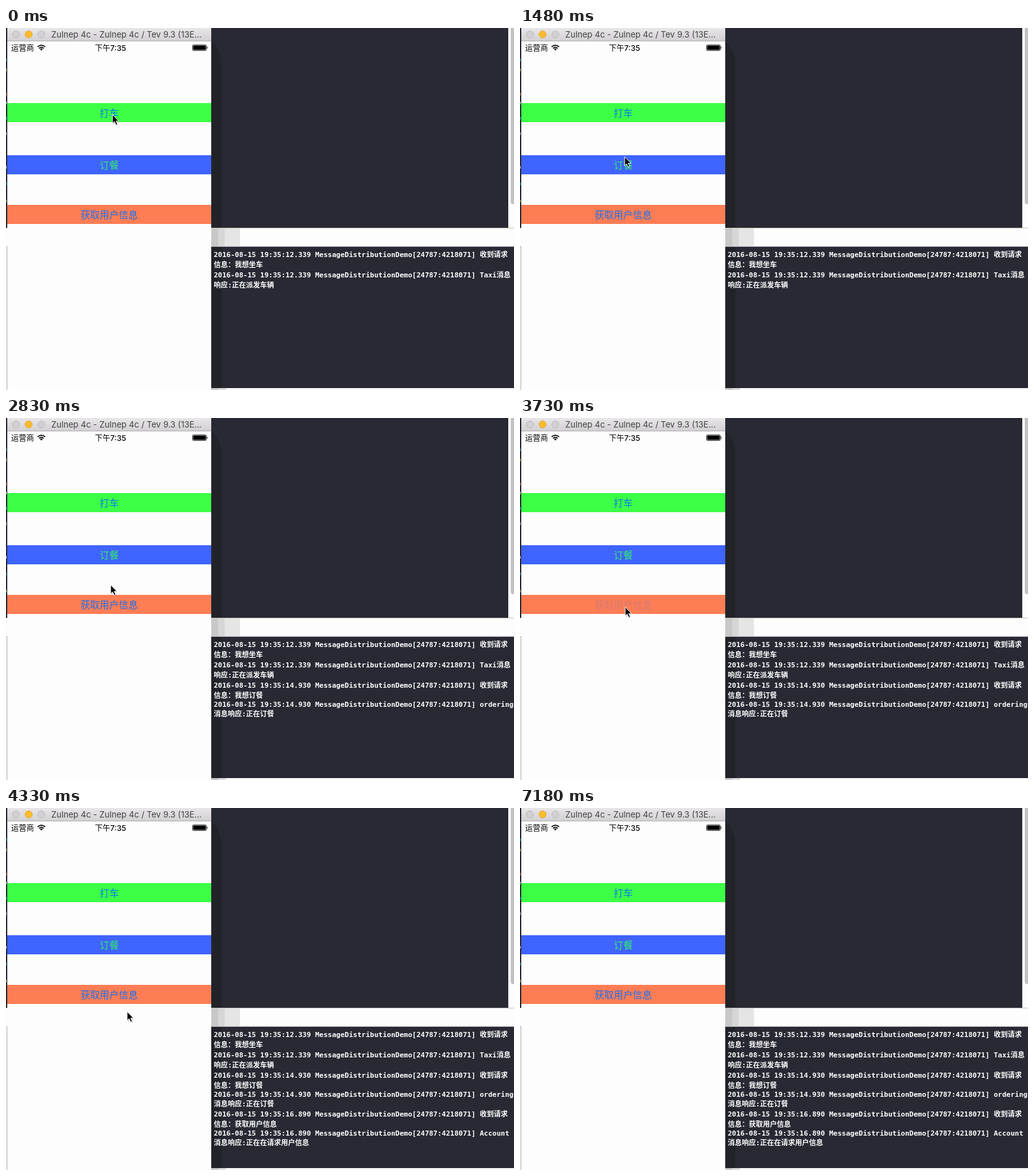
Write an HTML page that moves like this. It is 797 px wide and 569 px high and loops after 7.78 s.

```html
<!DOCTYPE html>
<html lang="zh-CN">
<head>
<meta charset="utf-8">
<style>
html, body { margin: 0; width: 100%; height: 100%; overflow: hidden; background: #fdfdfd; }
svg { display: block; }
text { white-space: pre; }
.ui { font-family: Inter, "Noto Sans CJK SC", "Noto Sans CJK", sans-serif; font-size: 12px; }
.button { font-size: 15px; text-anchor: middle; }
.log { font: bold 11px "DejaVu Sans Mono", "Noto Sans CJK SC", "Noto Sans CJK", monospace; fill: #fff; }
</style>
</head>
<body>
<svg width="797" height="569" viewBox="0 0 797 569">
  <defs>
    <linearGradient id="bar" x2="0" y2="1">
      <stop stop-color="#e8e6e8"/><stop offset="1" stop-color="#d2d0d2"/>
    </linearGradient>
  </defs>

  <!-- editor and console -->
  <rect width="788" height="314" fill="#282933"/>
  <rect x="792" y="-9" width="12" height="286" rx="4" fill="#c1c1c1"/>
  <path d="M322 22Q338 32 338 62V314H322Z" fill="#212329"/>
  <rect y="314" width="797" height="1" fill="#c9c5b8"/>
  <g id="shade"></g>
  <rect x="322" y="344" width="475" height="222" fill="#282933"/>
  <rect x="322" y="344" width="16" height="222" fill="#212329"/>
  <rect x="322" y="343" width="475" height="1" fill="#b5b5b8"/>
  <g id="specks"></g>
  <path d="M0 343.5H2M1.5 344V569" stroke="#b0b0b0"/>

  <!-- simulator window -->
  <rect x="2" width="320" height="569" fill="#fdfdfd"/>
  <rect x="2" width="320" height="20" fill="url(#bar)"/>
  <rect x="2" y="20" width="320" height="1" fill="#b4b2b4"/>
  <g stroke="#bcbabc" fill="#d2d0d2">
    <circle cx="15.5" cy="10" r="5.5"/>
    <circle cx="35.5" cy="10" r="5.5" fill="#fdbc2e" stroke="#e3a52b"/>
    <circle cx="55.5" cy="10" r="5.5"/>
  </g>
  <g class="ui">
    <text x="71" y="15" font-size="13.1" fill="#444">Zulnep 4c - Zulnep 4c / Tev 9.3 (13E...</text>
    <text x="8" y="35.5">运营商</text>
    <text x="164" y="35.5" text-anchor="middle" font-weight="500">下午7:35</text>
  </g>
  <g fill="none" stroke="#000" stroke-width="1.7">
    <path d="M49.6 29.6Q55.5 24.6 61.4 29.6M51.9 32Q55.5 28.8 59.1 32"/>
    <path d="M53.4 33.2Q55.5 31.4 57.6 33.2L55.5 35.6Z" fill="#000" stroke="none"/>
  </g>
  <rect x="292.5" y="26.5" width="22" height="9" rx="1.8" fill="none" stroke="#000" stroke-width=".7"/>
  <rect x="293.5" y="27.5" width="20" height="7" rx=".8"/>
  <path d="M315.5 29.3Q317.6 31 315.5 32.8Z"/>
  <g id="buttons"></g>
  <g id="logs"></g>

  <g id="cursor">
    <path d="M1 2V16L4 13.5L6.5 18L9 16.5L7 12H11Z" fill="#000" opacity=".18"/>
    <path d="M0 0V14L3.2 11.2L5.7 16.6L8.1 15.5L5.7 10.3H10Z" stroke="#fff" stroke-linejoin="round"/>
  </g>
</svg>
<script>
const $ = id => document.getElementById(id);

function add(parent, tag, attrs, label = "") {
  const el = document.createElementNS("http://www.w3.org/2000/svg", tag);
  for (const key in attrs) el.setAttribute(key, attrs[key]);
  el.textContent = label;
  parent.append(el);
  return el;
}
const rect = (id, x, y, width, height, fill) => add($(id), "rect", { x, y, width, height, fill });

// window shadow falling on the light bars
rect("shade", 322, 315, 45, 28, "#e5e5e5");
rect("shade", 322, 315, 21, 28, "#d6d6d6");
rect("shade", 322, 315, 11, 28, "#c8c8c8");
rect("shade", 322, 566, 23, 3, "#dcdcdc");
rect("shade", 322, 566, 11, 3, "#c8c8c8");

// code peeping out at the left edge
[[48, "#18b5c4"], [64, "#b9ad3c"], [102, "#c98432"], [116, "#ccc"], [140, "#18b5c4"],
 [164, "#aaa"], [217, "#ccc"], [243, "#18b5c4"], [270, "#a9b53c"]]
  .forEach(([y, fill]) => rect("specks", 0, y, 1, 4, fill));

const labels = [
  [118, "#3cff46", "#0a78f0", "打车"],
  [200, "#3f64ff", "#32f064", "订餐"],
  [278, "#ff7d55", "#1870f0", "获取用户信息"]
].map(([y, back, fill, label]) => {
  rect("buttons", 2, y, 320, 30, back);
  return add($("buttons"), "text", { class: "ui button", x: 162, y: y + 20.5, fill }, label);
});

const stamp = (time, rest) => `2016-08-15 19:35:${time} MessageDistributionDemo[24787:4218071] ${rest}`;
const logs = [
  ["12.339", "信息：我想坐车", "Taxi消息", "响应:正在派发车辆", [360, 376, 392, 408]],
  ["14.930", "信息：我想订餐", "ordering", "消息响应:正在订餐", [424, 440, 454, 469]],
  ["16.890", "信息：获取用户信息", "Account", "消息响应:正在在请求用户信息", [485, 501, 515, 530]]
].map(([time, request, handler, reply, rows]) => {
  const group = add($("logs"), "g", { class: "log" });
  [stamp(time, "收到请求"), request, stamp(time, handler), reply]
    .forEach((line, i) => add(group, "text", { x: 326, y: rows[i] }, line));
  return group;
});

const LOOP = 7780, TICK = 150, AWAY = -50;
// first tick, ticks taken, end x, end y, easing power
const moves = [
  [0, 8, 163.5, 217, 1.5],
  [8, 1, 163, 216, 1],
  [12, 7, 165, 297, 1],
  [24, 2, 190, 320, 1],
  [34, 1, 174, 310, 1],
  [35, 1, 206, 317, 1],
  [36, 1, AWAY, AWAY, 1],
  [42, 1, 709, 482, 1],
  [43, 1, 778, 549, 1],
  [44, 1, AWAY, AWAY, 1]
];

function cursorAt(tick) {
  let x = 167, y = 136;
  for (const [start, count, endX, endY, power] of moves) {
    if (tick < start) break;
    const u = Math.min(1, (tick - start + 1) / count) ** power;
    x += (endX - x) * u;
    y += (endY - y) * u;
  }
  return [x, y];
}

const pressAlpha = age => age === 0 ? 0.2 : age === 1 ? 0.6 : 1;

function draw(now) {
  const t = now % LOOP;
  const tick = t < 590 ? -1 : Math.floor((t - 580) / TICK);
  $("cursor").setAttribute("transform", `translate(${cursorAt(tick)})`);
  [8, 21].forEach((press, i) => {
    labels[i + 1].setAttribute("opacity", pressAlpha(tick - press));
    logs[i + 1].setAttribute("visibility", tick > press ? "visible" : "hidden");
  });
}

const begin = performance.now();
function loop() {
  draw(performance.now() - begin);
  requestAnimationFrame(loop);
}
loop();
</script>
</body>
</html>
```
